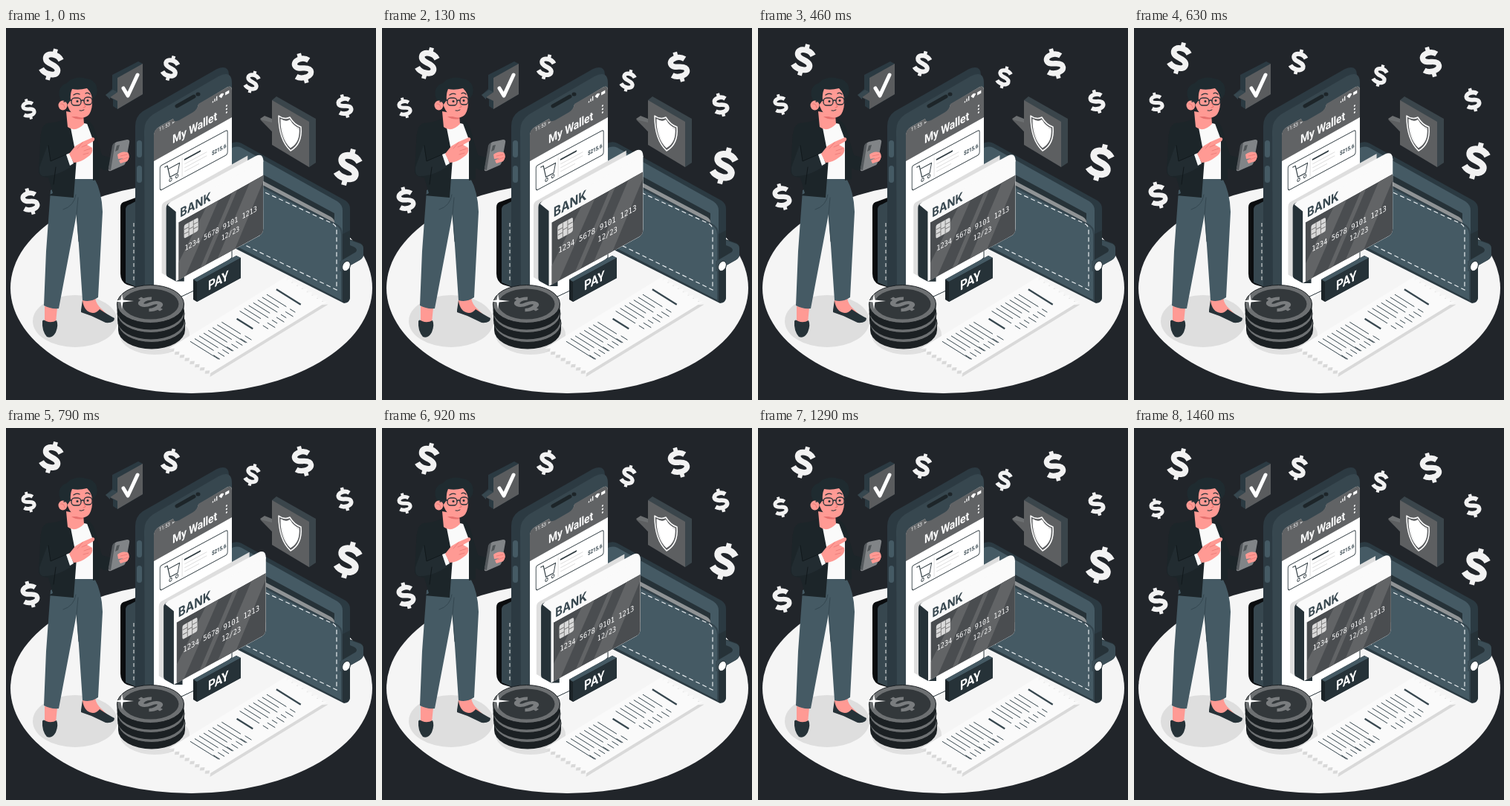
An HTML page for the animation above (1500 ms loop, 498x500 px).

```html
<!DOCTYPE html>
<html lang="en">
<head>
<meta charset="utf-8">
<title>Wallet</title>
<style>
html, body { margin: 0; width: 100%; height: 100%; overflow: hidden; background: #21252a; }
svg { display: block; width: 100vw; height: 100vh; }
text { font-family: Roboto, sans-serif; }
.mono { font-family: "DejaVu Sans Mono", monospace; fill: #fff; }
.line { fill: none; stroke-linecap: round; stroke-linejoin: round; }
.skin { fill: #ff9a94; }
</style>
</head>
<body>
<svg viewBox="0 0 498 500">
<defs>
  <clipPath id="face"><path d="M4 20H135V91Q135 98 129 98L4 97Z"/></clipPath>
  <g id="sign" fill="none">
    <path d="M25 -20C17 -29 5 -32 -4 -31C-18 -30 -24 -23 -23 -15C-21 -4 -9 -2 1 0C15 3 24 8 23 18C22 28 9 32 -2 31C-13 31 -22 27 -28 21" stroke-width="18"/>
    <path d="M0 -50V-30M0 30V50" stroke-width="14"/>
  </g>
</defs>
<ellipse cx="249.500" cy="349.500" rx="243.500" ry="141.500" fill="#f5f5f5"/>
<ellipse cx="93" cy="394" rx="57" ry="35" fill="#dedede"/>
<ellipse cx="200" cy="412" rx="47" ry="27" fill="#e0e0e0"/>

<g id="wallet">
  <path d="M154 241Q154 234 161 233L180 226V350L163 345Q154 341 154 330Z" fill="#0b0d0f"/>
  <path d="M161 243Q162 238 167 237L180 230V350L161 342Z" fill="#37474f"/>
  <path d="M172 262V340" stroke="#e8e8e8" stroke-dasharray="5 4"/>
  <path d="M296 160Q307 150 317 155L457 232Q463 236 463 243V362Q463 369 455 370L296 290Z" fill="#2b3a42"/>
  <path d="M296 168Q306 156 317 161L446 233Q453 238 453 245V362L296 285Z" fill="#455a64"/>
  <path d="M320 183L442 249V266L320 200Z" fill="#263238"/>
  <path d="M326 198L436 256Q440 258 440 264" fill="none" stroke="#8f9395" stroke-width="5"/>
  <path d="M296 189L444 265Q452 269 452 277V366L296 286Z" fill="#455a64"/>
  <path d="M296 188L444 264Q452 268 452 277V367" fill="none" stroke="#34454e" stroke-width="2"/>
  <path d="M340 217L440 263Q445 266 445 272V352L312 287" fill="none" stroke="#e8edf0" stroke-width="1.200" stroke-dasharray="6 4"/>
  <path d="M453 277L463 272V363Q462 369 453 369Z" fill="#263238"/>
  <path d="M460 283L477 289Q481 291 481 296V305Q481 309 476 312L460 321L449 327V314L460 307Z" fill="#263238"/>
  <path d="M463 285L477 290Q481 292 481 296V305Q481 309 476 312L460 321L449 327V314L471 301Q474 297 468 294L463 292Z" fill="#3b4d56"/>
  <ellipse cx="458" cy="320" rx="5" ry="7" transform="rotate(25 458 320)" fill="#fff" stroke="#263238"/>
</g>

<g id="receipt">
  <path id="paperShade" transform="translate(1 4)" fill="#d9d9d9"/>
  <path id="paper" fill="#fafafa"/>
  <g id="print" stroke="#37474f"/>
</g>

<g id="phone">
  <path d="M174 132Q174 119 184 112L284 55Q299 49 300 62V290L187 365L174 350Z" fill="#2c3a42"/>
  <path d="M186 138Q186 124 198 116L286 65Q304 56 304 74V310L187 370Z" fill="#37474f"/>
  <rect x="176" y="151" width="7" height="23" rx="3.500" fill="#455a64"/>
  <rect x="176" y="185" width="7" height="23" rx="3.500" fill="#455a64"/>
  <path d="M199 146Q199 137 206 133L225 122Q225 128 233 125L252 114Q258 110 259 103L297 80Q304 76 304 84V308L240 364L199 360Z" fill="#fff"/>
  <path d="M199 144Q199 137 206 133L225 122Q226 127 233 124L252 113Q258 109 259 102L297 80Q304 76 304 84V120L199 179Z" fill="#616365"/>
  <path d="M230 105L253 92M258 89H259" class="line" stroke="#1d2529" stroke-width="5"/>
  <g transform="matrix(.866 -.465 0 1 199 144)" fill="#fff">
    <text x="8" y="-1" font-size="7">11:53 ➢</text>
    <text x="29" y="25" font-size="16" font-weight="600" letter-spacing="-.2">My Wallet</text>
    <path d="M91-1v-2h1.500v2zM94-1v-4h1.500v4zM97-1v-6h1.500v6zM101-5q4-4 8 0l-4 4zM111-6h6v4h-6z"/>
    <circle cx="113" cy="13" r="1.200"/><circle cx="113" cy="17.500" r="1.200"/><circle cx="113" cy="22" r="1.200"/>
    <g stroke="#303c42" class="line">
      <rect x="9.500" y="46" width="105" height="33" rx="3"/>
      <path d="M17 51h4l4 17h12l3-12H22" stroke-width="1.200"/>
      <circle cx="26" cy="72" r="2"/><circle cx="36" cy="72" r="2"/>
      <path d="M48 55h24" stroke-width="2"/>
      <path d="M44 51v25M48 61h34M48 66h34M48 71h22" stroke="#dcdcdc"/>
    </g>
    <text x="90" y="69" font-size="7.500" font-weight="600" fill="#37474f" letter-spacing="-.2">$215.6</text>
  </g>
  <path d="M304 280V312M253 353L234 362" stroke="#263238"/>
</g>

<g id="card">
  <path d="M210 241Q210 236 214 234L325 172V270L224 337L210 329Z" fill="#dedede"/>
  <path d="M216 242Q216 237 221 235L240 230V340H229L218 334Q216 333 216 330Z" fill="#263238"/>
  <path d="M218 238Q219 236 222 234L336 172.500Q346 168 346 180L229 247Z" fill="#fafafa"/>
  <g transform="matrix(.866 -.48 0 1 229 243)">
    <path d="M0 2L5 0H135V91Q135 98 129 98L0 97Z" fill="#fafafa"/>
    <g clip-path="url(#face)">
      <path d="M0 20H135V98H0Z" fill="#4a4d50"/>
      <path d="M4 74L47 20H66L14 98H4ZM37 98L87 20H95L45 98ZM64 98L114 20H135V28L91 98Z" fill="#626466"/>
    </g>
    <text x="6.500" y="15" font-size="16.500" font-weight="700" fill="#37474f" style="font-family:Inter,sans-serif">BANK</text>
    <rect x="12.500" y="28" width="22" height="18" rx="2.500" fill="#d9d9d9"/>
    <path d="M13 34h7v6h-7M34 34h-7v6h7M20 28v18M27 28v18M20 37h7" fill="none" stroke="#777"/>
    <text class="mono" x="13.500" y="63" font-size="9.800">1234 5678 9101 1213</text>
    <text class="mono" x="70" y="76.500" font-size="9.400">12/23</text>
  </g>
</g>

<g id="pay">
  <path d="M252 338L310 306L316 309V336L257 368L252 365Z" fill="#1b2327"/>
  <path d="M252 338L310 306L316 309L257 341Z" fill="#455a64"/>
  <path d="M257 341L316 309V336L257 368Z" fill="#263238"/>
  <text transform="matrix(.866 -.47 0 1 272 353)" font-size="18" font-weight="700" fill="#fff">PAY</text>
</g>

<g id="coins"></g>
<path d="M156 357L157.500 365.500L172 367L157.500 368.500L156 378L154.500 368.500L144 367L154.500 365.500Z" fill="#fff"/>

<g id="woman">
  <path class="skin" d="M52 374L69 376L67 396L52 398ZM103 364L120 362Q121 372 130 379L137 386L120 388L102 382Z"/>
  <path d="M49 394Q50 391 54 394Q61 397 68 393Q71 399 67 409Q62 418 55 415Q48 407 49 394Z" fill="#263238"/>
  <path d="M101 379L103 366Q105 382 117 383Q122 383 126 378Q138 386 146 390Q146 397 134 396L115 387L101 382Z" fill="#263238"/>
  <path d="M60 218L92 203L119 202Q129 220 130 247L124 362Q114 369 103 366L98 292L95 250L71 377Q60 378 51 373L54 300Z" fill="#455a64"/>
  <path d="M94 224Q92 239 77 244M98 287L95 250L97 228" class="line" stroke="#344750"/>
  <path d="M82 132Q98 124 113 130L121 160L117 203L91 203L82 180Z" fill="#fafafa"/>
  <path d="M80 122Q70 127 55 128Q46 132 46 155L44 194Q46 201 57 201L63 222L57 225L91 228L95 175L87 134Z" fill="#1c2529"/>
  <path d="M107 123Q117 126 120 140L129 171L148 176L149 188Q136 195 126 188L126 203L117 205L117 150Z" fill="#1c2529"/>
  <path d="M56 157L60 179L84 168L91 184Q70 199 52 199Q44 200 45 187Z" fill="#222c31"/>
  <path d="M57 158L60 179L83 169M67 187L64 210" class="line" stroke="#11181b"/>
  <path d="M81 170L86 168L91 182L86 185Z" fill="#fafafa"/>
  <path class="skin" d="M85 169L93 159L103 153L117 147Q121 148 118 152L109 157L116 161Q118 169 109 174Q100 181 91 181Z"/>
  <path d="M103 154L96 162M109 157L102 160M114 162L105 165M111 168L104 170" class="line" stroke="#e6716f" stroke-width=".7"/>
  <path class="skin" d="M149 178L154 166Q160 164 164 167Q168 173 163 179L153 184Z"/>
  <path d="M145 157Q146 154 149 153L163 150Q167 150 166 154L161 181Q160 184 157 185L141 192Q137 193 138 189Z" fill="#818487"/>
  <path d="M143 158Q144 155 147 154L141 191Q137 191 138 188Z" fill="#54595d"/>
  <path d="M149 158L153 157L151 164L147 166Z" fill="#515659"/>
  <path class="skin" d="M150 170Q156 165 163 167Q168 173 163 179L154 182L152 178L158 175L151 176Z"/>
  <path d="M154 172L163 170M156 177L164 174" class="line" stroke="#e6716f" stroke-width=".7"/>
  <path class="skin" d="M81 112L83 133Q93 141 105 129L104 116Z"/>
  <path d="M88 119Q95 124 104 122V119Z" fill="#e6716f"/>
  <path class="skin" d="M80 92Q84 79 100 79Q116 79 116 94Q117 108 112 116Q106 123 95 119Q83 114 80 92Z"/>
  <path d="M75 99Q67 85 77 76Q82 75 86 70Q97 64 108 68Q119 69 122 79Q125 90 116 96Q116 88 109 81Q98 84 89 82Q86 89 87 97L82 104Z" fill="#1f2b30"/>
  <ellipse class="skin" cx="76.500" cy="104" rx="6" ry="6.500"/>
  <path d="M74 102Q78 101 79 107" class="line" stroke="#e6716f" stroke-width=".8"/>
  <g class="line" stroke="#263238" stroke-width="1.300">
    <rect x="88" y="94" width="13" height="10" rx="4.500"/>
    <rect x="105" y="93" width="11" height="10" rx="4.500"/>
    <path d="M101 98Q103 96 105 98M88 97L78 99M91 90Q95 87 99 89M107 88Q110 86 113 89"/>
    <path d="M99 111Q102 112 105 110" stroke-width="1"/>
  </g>
  <circle cx="96" cy="98.500" r="1.500" fill="#263238"/><circle cx="110" cy="97.500" r="1.500" fill="#263238"/>
  <path d="M104 100L107 106L104 107" class="line" stroke="#e6716f"/>
</g>

<g id="bubbles">
  <path d="M143 63L178 45L184 48V89L150 109L144 105V96L134 90L143 82Z" fill="#2b3a42"/>
  <path d="M150 67L184 48V89L150 109V98L140 93L150 86Z" fill="#5a5c5e"/>
  <path d="M134 90L144 83L150 86L140 93V96Z" fill="#37474f"/>
  <path d="M158 81L164 91L177 63" class="line" stroke="#fff" stroke-width="5"/>
  <path d="M358 97L364 92L417 122V181L408 187Z" fill="#3a454b"/>
  <path d="M342 122L348 118L358 122V139Z" fill="#6c6f71"/>
  <path d="M358 97L408 126V187L358 157V139L342 123L358 127Z" fill="#5d5f61"/>
  <path id="shield" d="M367 118Q375 124 382 120Q388 130 397 133Q399 156 383 165Q367 150 367 118Z" fill="none" stroke="#fff" stroke-width="1.500" stroke-linejoin="round"/>
  <use href="#shield" transform="translate(382 142) scale(.8) translate(-382 -142)" style="fill:#fff"/>
  <path d="M370 123Q376 127 382 123Q387 132 394 136Q395 154 383 161Q371 148 370 123Z" fill="#fff"/>
</g>
<g id="dollars"></g>
</svg>
<script>
const $ = id => document.getElementById(id);
const LOOP = 1500;

const dollar = (x, y, height, tilt) =>
  `<use href="#sign" stroke="#f2f2f2" transform="translate(${x} ${y}) rotate(${tilt}) scale(${height / 100})"/>`;
$('dollars').innerHTML = [
  [61.5, 49, 43, 15], [221.5, 54, 34, 15], [331.5, 72.5, 30, 15], [399.5, 54, 41, -15],
  [456, 105, 32, -15], [461, 187, 50, 15], [30.5, 109, 28, -15], [32.5, 233, 36, -15]
].map(d => dollar(...d)).join('');

// Coins, bottom to top
const coin = (x, y) => `
  <path d="M${x - 45} ${y}V${y + 9}A45 25.500 0 0 0 ${x + 45} ${y + 9}V${y}Z" fill="#1b2023"/>
  <ellipse cx="${x}" cy="${y}" rx="45" ry="25.500" fill="#6d7072" stroke="#1b2023"/>
  <ellipse cx="${x}" cy="${y}" rx="38" ry="20.500" fill="#33383b"/>`;
$('coins').innerHTML = coin(196, 397) + coin(195, 384) + coin(194.5, 371) +
  '<use href="#sign" stroke="#7a7d7f" transform="matrix(.29 -.165 .29 .165 194.5 371)"/>';

// Receipt: u runs along the paper, v across it
const point = (u, v) => `${219 + .866 * u + .8 * v} ${431 - .53 * u + .5 * v}`;
const edge = [];
for (let i = 0; i <= 16; i++) edge.push(point(i % 2 * 5, i * 4.25));
for (let i = 16; i >= 0; i--) edge.push(point(184 - i % 2 * 5, i * 4.25));
const outline = `M${edge.join('L')}Z`;
$('paper').setAttribute('d', outline);
$('paperShade').setAttribute('d', outline);
const rule = (u, from, to, width = 1) =>
  `<path d="M${point(u, from)}L${point(u, to)}" stroke-width="${width}"/>`;
let print = rule(159, 9, 50, 2.2) + rule(91, 16, 43, 2.2);
for (let i = 0; i < 8; i++) {
  print += rule(26 + i * 7, 8, i % 3 ? 40 : 56) + rule(27 + i * 7, 46, 57);
  if (i < 7) print += rule(103 + i * 7, 8, i % 2 ? 36 : 41) + rule(103 + i * 7, 47, i % 2 ? 60 : 56);
}
$('print').innerHTML = print;

// Double heartbeat: time, scale
const beat = [[0, 1.005], [130, 1.085], [185, 1.11], [330, 1.035], [490, 1.005],
  [630, 1.035], [710, 1.095], [790, 1.06], [1050, 1], [1460, 1], [1500, 1.005]];
const beatAt = t => {
  const i = beat.findIndex(([time]) => time > t);
  const [t0, s0] = beat[i - 1], [t1, s1] = beat[i];
  return s0 + (s1 - s0) * (t - t0) / (t1 - t0);
};

function draw() {
  const t = performance.now() % LOOP;
  const rise = 10 * (1 - Math.abs(2 * t / LOOP - 1));
  $('dollars').setAttribute('transform', `translate(0 ${-rise})`);
  $('card').setAttribute('transform', `translate(281 258) scale(${beatAt(t)}) translate(-281 -258)`);
  requestAnimationFrame(draw);
}
draw();
</script>
</body>
</html>
```
